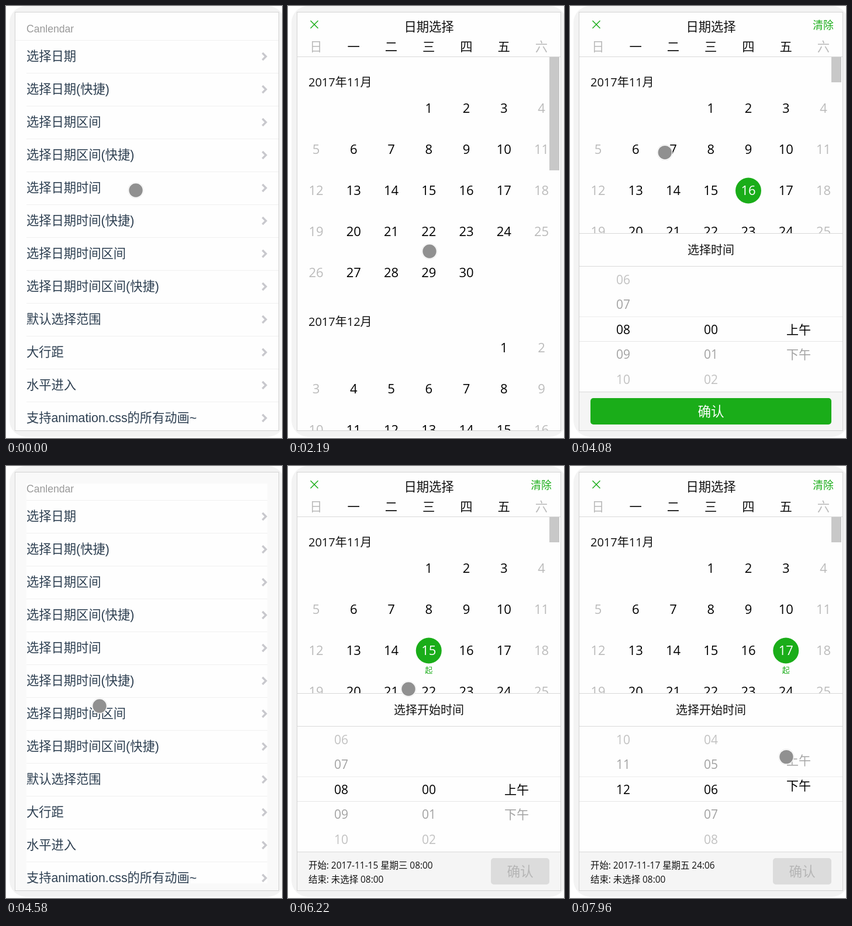
Write an HTML page with a canvas that moves like this. It is 472 px wide and 736 px high and loops after 7.99 s.

```html
<!DOCTYPE html>
<html lang="zh-CN">
<head>
<meta charset="utf-8">
<style>
  html, body { margin: 0; overflow: hidden; background: #fff; }
  canvas { display: block; }
</style>
</head>
<body>
<canvas id="stage" width="472" height="736"></canvas>
<script>
const ctx = document.getElementById('stage').getContext('2d');
const LOOP = 7990;
const LEFT = 16, TOP = 11, WIDTH = 450, HEIGHT = 712, CENTER = 241;
const COLUMN = 64.25, WEEK = 70, WHEEL_ROW = 42.4, WHEEL_MIDDLE = 551;
const GREEN = '#1aad19', WHITE = '#fefefe', INK = '#111', PALE = '#bbb', RULE = '#d9d9d9';
const CJK = '"Noto Sans CJK SC", "Noto Sans CJK JP", "Noto Sans CJK", sans-serif';
const LIST_FONT = '"Liberation Sans", ' + CJK;
const CAL_FONT = '"Open Sans", "Noto Sans", ' + CJK;

const menu = ['选择日期', '选择日期(快捷)', '选择日期区间', '选择日期区间(快捷)',
  '选择日期时间', '选择日期时间(快捷)', '选择日期时间区间', '选择日期时间区间(快捷)',
  '默认选择范围', '大行距', '水平进入', '支持animation.css的所有动画~'];
const weekdays = [...'日一二三四五六'];

const pad = n => String(n).padStart(2, '0');
const progress = (t, from, to) => Math.min(1, Math.max(0, (t - from) / (to - from)));
const easeOut = p => 1 - (1 - p) ** 2;
const smooth = p => p * p * (3 - 2 * p);
const mix = (a, b, p) => a + (b - a) * p;
const columnX = i => 48 + COLUMN * i;

// Each wheel is dragged once, from value a to value b
const wheels = [
  { x: 91, a: 8, b: 12, min: 1, max: 12, start: 6930, end: 7150, label: pad },
  { x: 241, a: 0, b: 6, min: 0, max: 59, start: 7290, end: 7540, label: pad },
  { x: 391, a: 0, b: 1.165, min: 0, max: 1, start: 7730, end: 7960, label: i => ['上午', '下午'][i] },
];
const wheelValue = (w, t) => mix(w.a, w.b, smooth(progress(t, w.start, w.end)));

// Pointer stops: arrival time, x, y
const stops = [
  [1950, 222, 314], [2190, 242, 418], [2500, 305, 322], [2750, 316, 409], [3050, 320, 333],
  [3420, 314, 279], [4050, 169, 262], [4270, 45, 32], [4580, 160, 409], [5650, 162, 178],
  [5940, 227, 323], [6120, 227, 323], [6220, 206, 380], [6500, 368, 322],
];
for (const w of wheels) {
  const x = mix(w.x, CENTER, 0.14), pull = Math.min(150, (w.b - w.a) * WHEEL_ROW);
  stops.push([w.start, x, 545], [w.end, x, 545 - pull]);
}

function pointerAt(t) {
  let [, x, y] = stops[0];
  for (let i = 1; i < stops.length; i++) {
    const [arrive, toX, toY] = stops[i];
    const p = smooth(progress(t, Math.max(stops[i - 1][0], arrive - 300), arrive));
    x = mix(x, toX, p);
    y = mix(y, toY, p);
  }
  const bob = 41 * Math.sin(Math.PI * progress(t, 500, 880))
    + 48 * Math.sin(Math.PI * progress(t, 1276, 1670));
  return [x + bob * 0.15, y + bob];
}

function rect(x, y, w, h, color) {
  ctx.fillStyle = color;
  ctx.fillRect(x, y, w, h);
}
const rule = (y, color = RULE, x = LEFT) => rect(x, y, LEFT + WIDTH - x, 1, color);
function rounded(x, y, w, h, r, color) {
  ctx.fillStyle = color;
  ctx.beginPath();
  ctx.roundRect(x, y, w, h, r);
  ctx.fill();
}
const disc = (x, y, r, color) => rounded(x - r, y - r, 2 * r, 2 * r, r, color);
function stroke(points, width, color) {
  ctx.strokeStyle = color;
  ctx.lineWidth = width;
  ctx.beginPath();
  points.forEach(([x, y]) => ctx.lineTo(x, y));
  ctx.stroke();
}
// y is the visual centre of the line
function text(str, x, y, size, color, align = 'center', font = CAL_FONT) {
  ctx.font = `${size}px ${font}`;
  ctx.textAlign = align;
  ctx.fillStyle = color;
  ctx.fillText(str, x, Math.round(y + size * 0.37));
}
function clipped(x, y, w, h, draw) {
  ctx.save();
  ctx.beginPath();
  ctx.rect(x, y, w, h);
  ctx.clip();
  draw();
  ctx.restore();
}

function drawList() {
  rect(LEFT, TOP, WIDTH, HEIGHT, WHITE);
  text('Canlendar', 35, 38, 17.6, '#999', 'left', LIST_FONT);
  rule(58, '#f0f0f0');
  menu.forEach((label, i) => {
    const y = 85 + 56 * i;
    text(label, 35, y, 21.28, '#2c3e50', 'left', LIST_FONT);
    rule(y + 29, '#f0f0f0', 35);
    stroke([[438.5, y - 5], [444.5, y + 1], [438.5, y + 7]], 3.4, '#c8c8cd');
  });
}

function drawMonth(title, top, firstColumn, days, selected, isRange) {
  text(title, 35, top, 20, INK, 'left');
  for (let day = 1; day <= days; day++) {
    const cell = firstColumn + day - 1, column = cell % 7;
    const x = columnX(column), y = top + 44 + WEEK * Math.floor(cell / 7);
    const active = day === selected;
    if (active) {
      disc(x, y + 0.5, 22, GREEN);
      if (isRange) text('起', x, y + 33, 13, GREEN);
    }
    text(day, x, y, 22, active ? '#fff' : column % 6 ? '#000' : PALE);
  }
}

function drawWheel(w, t) {
  const value = wheelValue(w, t);
  for (let i = w.min; i <= w.max; i++) {
    const far = Math.abs(i - value), grey = Math.round(130 + 32 * far);
    if (far < 3) text(w.label(i), w.x, WHEEL_MIDDLE + (i - value) * WHEEL_ROW, 21,
      far < 0.5 ? '#000' : `rgb(${grey},${grey},${grey})`);
  }
}

function drawPanel(t, day, isRange) {
  rect(LEFT, 387, WIDTH, 336, WHITE);
  rule(387);
  text(isRange ? '选择开始时间' : '选择时间', CENTER, 416, 20, INK);
  rule(443);
  clipped(LEFT, 444, WIDTH, 213, () => wheels.forEach(w => drawWheel(w, t)));
  rule(529, '#ececec');
  rule(571, '#e6e6e6');
  rect(LEFT, 657, WIDTH, 66, '#f5f5f5');
  rule(657);
  if (isRange) {
    const [hour, minute, half] = wheels.map(w => Math.round(wheelValue(w, t)));
    const clock = pad(hour + 12 * half) + ':' + pad(minute);
    text(`开始: 2017-11-${day} 星期${weekdays[(day + 2) % 7]} ${clock}`, 35, 680, 15.4, INK, 'left');
    text('结束: 未选择 08:00', 35, 704, 15.4, INK, 'left');
  }
  const x = isRange ? 347 : 35;
  rounded(x, 668, 447 - x, 45, 5, isRange ? '#dcdcdc' : GREEN);
  text('确认', (x + 447) / 2, 691, 22.6, isRange ? '#b5b5b5' : '#fff');
}

function drawCalendar(t, selected, selectTime, isRange) {
  rect(LEFT, TOP, WIDTH, HEIGHT, WHITE);
  for (const s of [-6.5, 6.5]) stroke([[45 - s, 31.5 - 6.5], [45 + s, 31.5 + 6.5]], 1.5, GREEN);
  text('日期选择', CENTER, 35, 21.3, INK);
  if (selected) text('清除', 433, 32, 17.8, GREEN);
  weekdays.forEach((name, i) => text(name, columnX(i), 69, 21.3, i % 6 ? INK : PALE));
  rule(86);
  clipped(LEFT, 87, WIDTH, 636, () => {
    drawMonth('2017年11月', 130, 3, 30, selected, isRange);
    drawMonth('2017年12月', 538, 5, 31);
    rect(447, 87, 17, selected ? 43 : 193, '#c8c8c8');
    if (selected) {
      ctx.translate(0, 336 * (1 - easeOut(progress(t, selectTime, selectTime + 80))));
      drawPanel(t, selected, isRange);
    }
  });
}

function drawPointer(t) {
  const [x, y] = pointerAt(t);
  disc(x, y, 13.5, 'rgba(205,205,205,.5)');
  disc(x, y, 12.9, '#fff');
  disc(x, y, 11.7, '#909090');
}

function draw(t) {
  rect(0, 0, 472, 736, '#fff');
  rounded(6, 0, 470, 734, 28, '#f3f3f3');
  rect(LEFT - 1, TOP - 1, WIDTH + 2, HEIGHT + 2, '#d3d3d3');
  clipped(LEFT, TOP, WIDTH, HEIGHT, () => {
    drawList();
    // The closing calendar leaves a pale border for a moment
    if (t >= 4540 && t < 4640) {
      rect(LEFT, TOP, WIDTH, HEIGHT, '#f9f9f9');
      clipped(35, 30, 412, 681, drawList);
    }
    const isRange = t > 4700;
    const shown = isRange
      ? easeOut(progress(t, 4950, 5150))
      : easeOut(progress(t, 1970, 2170)) - progress(t, 4370, 4540) ** 2;
    if (shown > 0) {
      const selectTime = isRange ? 6120 : 2540;
      const day = isRange ? (t < 6540 ? 15 : 17) : 16;
      ctx.translate(0, Math.round(HEIGHT * (1 - shown)));
      drawCalendar(t, t < selectTime ? 0 : day, selectTime, isRange);
    }
  });
  drawPointer(t);
}

function frame() {
  draw(performance.now() % LOOP);
  requestAnimationFrame(frame);
}
frame();
</script>
</body>
</html>
```
